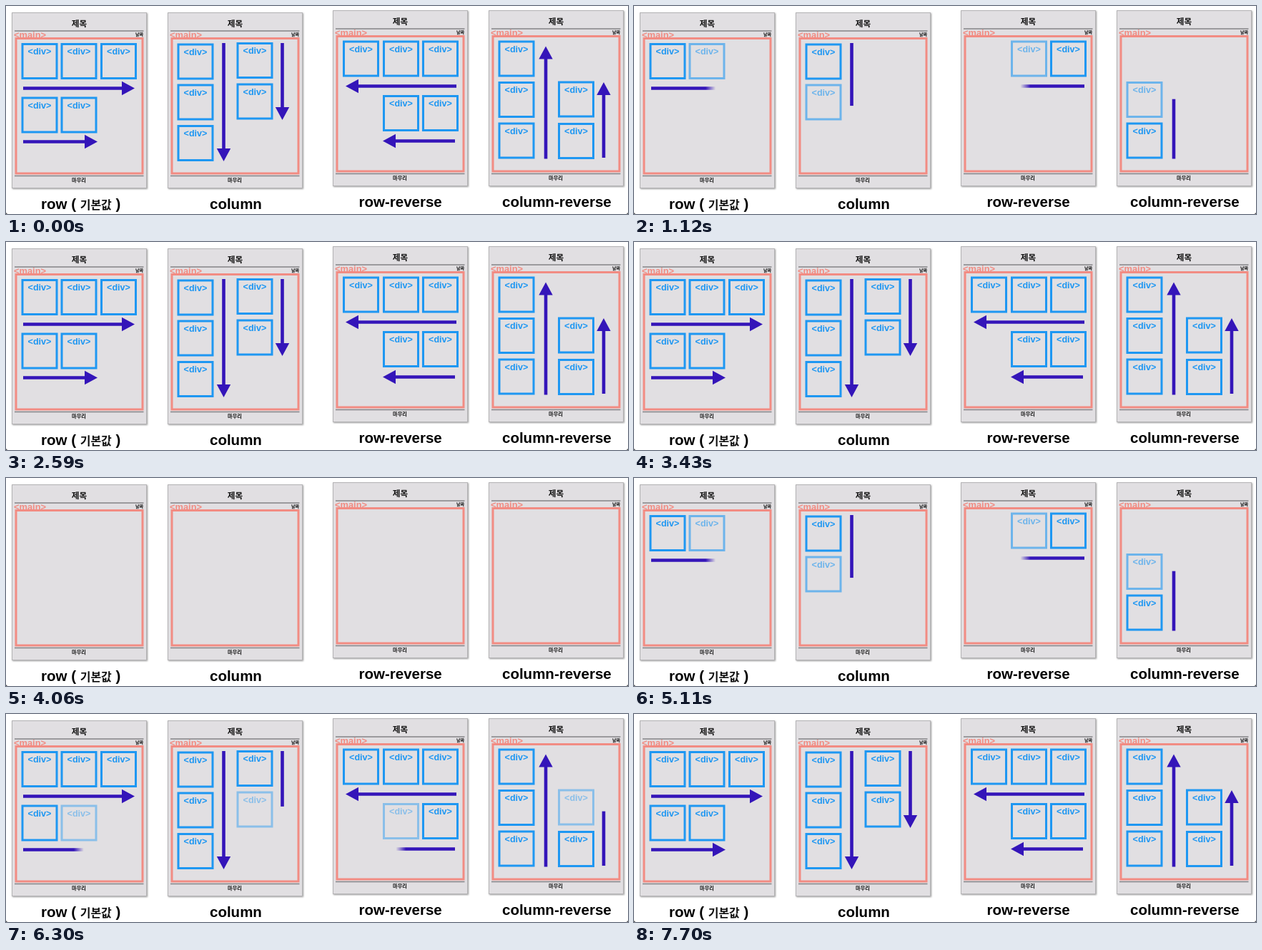
Animation of 870 by 292 pixels, one loop 7.77 s. Source, as an HTML page:

```html
<!DOCTYPE html>
<html lang="ko">
<head>
<meta charset="utf-8">
<title>flex-direction</title>
<style>
  html, body { margin: 0; width: 100%; height: 100%; overflow: hidden; background: #fff; }
  svg { display: block; width: 870px; height: 292px; }
  text { font-family: "Liberation Sans", Arial, sans-serif; font-weight: 700; }
  .ko { font-family: "Noto Sans CJK KR", "Noto Sans CJK", sans-serif; font-weight: 900; fill: #111; }
  .tag { fill: #f28c83; font-size: 12.85px; }
  .box rect { fill: none; stroke: #1e97f2; stroke-width: 3; }
  .box text { fill: #1e97f2; font-size: 12.6px; text-anchor: middle; }
  .label { font-size: 20.5px; fill: #000; }
  .mid { text-anchor: middle; }
</style>
</head>
<body>
<svg id="stage" viewBox="0 0 870 292">
  <defs>
    <filter id="shadow" x="-5%" y="-5%" width="110%" height="110%">
      <feDropShadow dx="1" dy="1" stdDeviation="1" flood-color="#000" flood-opacity=".4"/>
    </filter>
  </defs>
</svg>
<script>
const LOOP = 7770, TICK = 70;
const RESTARTS = [70, 4060];      // moments when every page is cleared
const DELAY = 385, PER_BOX = 418; // wait before the first box, time per box

// Each run is a line of boxes [x, y] and the arrow [x, y, length] drawn beside them.
const layouts = [
  { x: 0, y: 0, label: "row", labelX: 49, labelY: 285, angle: 0, soft: 14, runs: [
    { boxes: [[23, 53.5], [78, 53.5], [133.5, 53.5]], arrow: [24, 115.5, 156] },
    { boxes: [[23, 129], [78, 129]], arrow: [24, 190.5, 104] }] },
  { x: 218, y: 0, label: "column", labelX: 285, labelY: 285, angle: 90, soft: 1, runs: [
    { boxes: [[241, 54], [241, 111], [241, 168.5]], arrow: [304.5, 52, 166] },
    { boxes: [[324, 52.5], [324, 110]], arrow: [386.5, 52, 108] }] },
  { x: 449, y: -3, label: "row-reverse", labelX: 493.5, labelY: 282, angle: 180, soft: 14, runs: [
    { boxes: [[583.5, 50], [528.5, 50], [472.5, 50]], arrow: [630, 112.5, 155] },
    { boxes: [[583.5, 126.5], [528.5, 126.5]], arrow: [628, 189.5, 101] }] },
  { x: 667, y: -3, label: "column-reverse", labelX: 694, labelY: 282, angle: -90, soft: 1, runs: [
    { boxes: [[690, 165], [690, 107.5], [690, 50]], arrow: [755, 214.5, 158] },
    { boxes: [[773.5, 165.5], [773.5, 107]], arrow: [836, 213, 106] }] }
];

const stage = document.getElementById("stage");
const clamp = v => Math.min(1, Math.max(0, v));

function add(parent, name, attrs, text) {
  const node = document.createElementNS("http://www.w3.org/2000/svg", name);
  for (const key in attrs) node.setAttribute(key, attrs[key]);
  if (text) node.textContent = text;
  parent.appendChild(node);
  return node;
}

function addPage({ x, y }) {
  const page = add(stage, "g", { transform: `translate(${x} ${y})` });
  add(page, "rect", { x: 8.5, y: 9.5, width: 188, height: 246, fill: "#e1dfe2",
    stroke: "#b4b3b5", filter: "url(#shadow)" });
  add(page, "path", { d: "M12 35H192.5M12 238.5H192.5", stroke: "#858487", "stroke-width": 1.6 });
  add(page, "text", { class: "ko mid", x: 102.5, y: 29, "font-size": 11.6 }, "제목");
  add(page, "text", { class: "ko", x: 181, y: 41.6, "font-size": 6 }, "날짜");
  add(page, "text", { class: "ko mid", x: 102, y: 246.5, "font-size": 7.2 }, "마무리");
  add(page, "rect", { x: 14, y: 45.5, width: 177, height: 189.5, fill: "none",
    stroke: "#f28c83", "stroke-width": 3 });
  add(page, "text", { class: "tag", x: 11, y: 44.5 }, "<main>");
}

function addBox([x, y]) {
  const box = add(stage, "g", { class: "box", transform: `translate(${x} ${y})` });
  add(box, "rect", { width: 48, height: 48 });
  add(box, "text", { x: 24, y: 14.8 }, "<div>");
  return box;
}

let gradients = 0;
function addArrow([x, y, length], angle) {
  const id = "wipe" + gradients++;
  const wipe = add(stage.querySelector("defs"), "linearGradient",
    { id, gradientUnits: "userSpaceOnUse", y1: 0, y2: 0 });
  add(wipe, "stop", { offset: 0, "stop-color": "#3415b9" });
  add(wipe, "stop", { offset: 1, "stop-color": "#3415b9", "stop-opacity": 0 });
  const neck = length - 18;
  add(stage, "path", {
    d: `M0-2.3H${neck}V-9.7L${length} 0L${neck} 9.7V2.3H0Z`,
    transform: `translate(${x} ${y}) rotate(${angle})`,
    fill: `url(#${id})`
  });
  return wipe;
}

const runs = [];
for (const layout of layouts) {
  addPage(layout);
  const label = add(stage, "text",
    { class: "label", x: layout.labelX, y: layout.labelY }, layout.label);
  if (layout.label === "row") {
    add(label, "tspan", {}, " ( ");
    add(label, "tspan", { class: "ko", style: "font-size:16px;font-weight:700" }, "기본값");
    add(label, "tspan", {}, " )");
  }
  let before = 0;
  for (const { boxes, arrow } of layout.runs) {
    runs.push({
      start: DELAY + before * PER_BOX,
      boxes: boxes.map(addBox),
      wipe: addArrow(arrow, layout.angle),
      length: arrow[2],
      soft: layout.soft
    });
    before += boxes.length;
  }
}

// Dark tips behind the rounded lower corners.
add(stage, "path", { d: "M0 289Q0 292 3 292H0ZM870 289Q870 292 867 292H870Z", fill: "#222" });

function draw(ms) {
  const t = Math.floor((ms % LOOP) / TICK) * TICK;
  const cleared = RESTARTS.filter(r => r <= t).pop();
  const elapsed = cleared === undefined ? LOOP : t - cleared;
  for (const { start, boxes, wipe, length, soft } of runs) {
    const shown = (elapsed - start) / PER_BOX;
    boxes.forEach((box, i) => box.setAttribute("opacity", clamp(shown - i)));
    const edge = clamp(shown / boxes.length) * (length + soft);
    wipe.setAttribute("x1", edge - soft);
    wipe.setAttribute("x2", edge);
  }
}

const began = performance.now();
function tick() {
  draw(performance.now() - began);
  requestAnimationFrame(tick);
}
tick();
</script>
</body>
</html>
```
